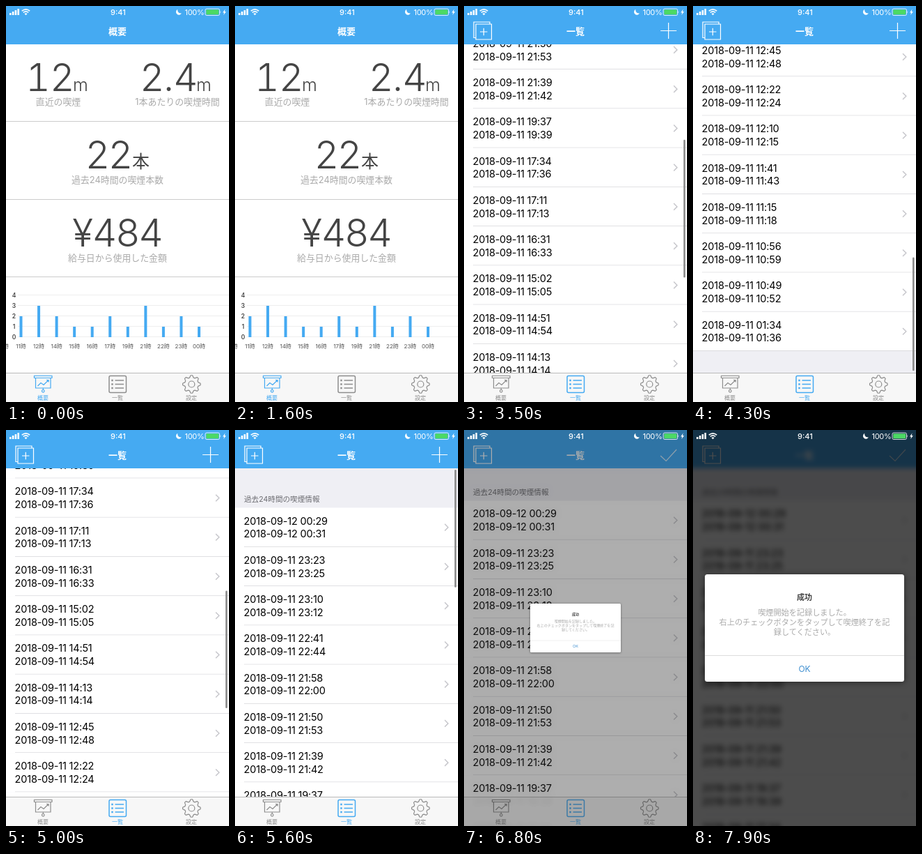
These frames come from a looping animation (320x568 px, 8000 ms). An HTML page:

```html
<!DOCTYPE html>
<html lang="ja">
<head>
<meta charset="utf-8">
<title>概要</title>
<style>
html, body { margin: 0; width: 100%; height: 100%; overflow: hidden; background: #fff; }
svg { display: block; width: 100vw; height: 100vh; font-family: Inter, "Noto Sans CJK JP", "Noto Sans CJK", sans-serif; }
.line { fill: none; stroke-width: 1.2; }
.mid { text-anchor: middle; }
.title { font-size: 13px; font-weight: 700; fill: #fff; }
.big { font-size: 55px; font-weight: 350; fill: #444; font-optical-sizing: none; letter-spacing: -.8px; }
.even { font-variant-numeric: tabular-nums; }
.unit { font-size: 25px; font-weight: 350; fill: #444; }
.cap { font-size: 12.9px; fill: #aaa; }
.row { font-size: 14.5px; letter-spacing: -.2px; fill: #000; }
.tab { font-size: 8px; font-weight: 500; }
.status { font-size: 11px; fill: #fff; }
.body { font-size: 11.15px; fill: #aaa; }
#shade { mix-blend-mode: multiply; }
#blur { filter: blur(3.5px); }
#card { filter: drop-shadow(0 1px 4px rgba(0,0,0,.5)); }
</style>
</head>
<body>
<svg viewBox="0 0 320 568">
  <rect width="320" height="568" fill="#fff"/>
  <g id="overview">
    <rect width="320" height="55" fill="#45aaf2"/>
    <text class="mid title" x="160" y="40.5">概要</text>
    <g class="big mid">
      <text class="even" x="63" y="122">12</text><text x="233.5" y="122">2.4</text>
      <text x="147.5" y="233">22</text><text x="160" y="345">¥484</text>
    </g>
    <g class="unit">
      <text x="96" y="122">m</text><text x="273" y="122">m</text><text x="181" y="232">本</text>
    </g>
    <g class="cap mid">
      <text x="75" y="142">直近の喫煙</text><text x="246" y="142">1本あたりの喫煙時間</text>
      <text x="160" y="254">過去24時間の喫煙本数</text><text x="160" y="365.5">給与日から使用した金額</text>
    </g>
    <path d="M0 165.5H320M0 277.5H320M0 388.5H320" stroke="#ccc"/>
    <g id="chart"></g>
  </g>
  <g id="list">
    <rect x="-30" y="0" width="380" height="620" fill="#efeff4"/>
    <g id="rows">
      <text x="13" y="93" font-size="10.6" fill="#6d6d72">過去24時間の喫煙情報</text>
    </g>
    <rect x="-30" y="-30" width="380" height="85" fill="#45aaf2"/>
    <text class="mid title" x="160" y="40.5">一覧</text>
  </g>
  <rect id="thumb" x="315" width="2.6" rx="1.3" fill="#8a8a8a"/>
  <g id="tabs">
    <rect y="526" width="320" height="42" fill="#f7f7f7"/>
    <path d="M0 526.5H320" stroke="#bbb"/>
    <g id="tab0">
      <path class="line" d="M40.5 530.5H66V533.5H40.5ZM42.5 533.5V548H64V533.5M45.5 545L50 540.5L54 543.5L61 536.5M58 536.5H61V539.5M53.3 548V550.5"/>
      <circle class="line" cx="53.3" cy="552.3" r="1.8"/>
      <text class="mid tab" x="53" y="565" stroke="none">概要</text>
    </g>
    <g id="tab1">
      <rect class="line" x="148" y="530.5" width="24.5" height="24" rx="2" style="stroke-width:1.5"/>
      <path class="line" style="stroke-width:1.6" d="M156.5 537H169M156.5 542.5H169M156.5 548H169"/>
      <path class="line" style="stroke-width:2.4" d="M151.3 537H153.7M151.3 542.5H153.7M151.3 548H153.7"/>
      <text class="mid tab" x="160" y="565" stroke="none">一覧</text>
    </g>
    <g id="tab2">
      <path class="line" id="gear"/>
      <circle class="line" cx="266.3" cy="542.5" r="4.5"/>
      <text class="mid tab" x="266" y="565" stroke="none">設定</text>
    </g>
  </g>
  <use id="blur" href="#list"/>
  <g id="icons" class="line" stroke="#fff">
    <path d="M17 26H39.5V48H17ZM16.5 45.5H14V23H37V25.5M23 37H33.5M28.3 31.8V42.2"/>
    <path id="plus" d="M282 35.5H305M293.5 24V47"/>
    <path id="check" d="M282 37L290 44.5L305 28" stroke-opacity=".75"/>
  </g>
  <rect id="shade" width="320" height="568"/>
  <g fill="#fff">
    <path d="M5 10h2.6v3h-2.6zM8.8 8h2.6v5h-2.6zM12.6 6h2.6v7h-2.6zM16.4 4h2.6v9h-2.6z"/>
    <path d="M22.8 7.2Q28.5 2.4 34.2 7.2M24.8 9.4Q28.5 6.2 32.2 9.4" fill="none" stroke="#fff" stroke-width="1.6"/>
    <path d="M26.4 11Q28.5 9.4 30.6 11L28.5 13.2Z"/>
    <text class="status mid" x="161" y="12.5" font-weight="500">9:41</text>
    <path d="M246.3 4.8A4.2 4.2 0 1 0 252 10.3A4.6 4.6 0 0 1 246.3 4.8Z"/>
    <text class="status" x="256.5" y="12.5" letter-spacing="-.3">100%</text>
    <rect x="286" y="4" width="20.5" height="9.5" rx="2" fill="none" stroke="#fff" stroke-width=".8"/>
    <rect x="287.3" y="5.3" width="18" height="7" rx="1" fill="#4cd964"/>
    <path d="M307.5 7.2q1.6 1.5 0 3zM314.5 4.5L311 9.5H313L312.3 13L315.8 8H313.8Z"/>
  </g>
  <g id="alert">
    <rect id="card" x="17" y="207" width="286" height="154" rx="3.5" fill="#fff"/>
    <text class="mid" x="160" y="244" font-size="11" font-weight="700" fill="#444">成功</text>
    <g class="body mid">
      <text x="160" y="265.5">喫煙開始を記録しました。</text>
      <text x="160" y="279.5">右上のチェックボタンをタップして喫煙終了を記</text>
      <text x="160" y="293.5">録してください。</text>
    </g>
    <path d="M17 323.5H303" stroke="#ddd"/>
    <text class="mid" x="160" y="346.5" font-size="12" fill="#3f8fd0">OK</text>
  </g>
</svg>
<script>
const $ = id => document.getElementById(id);
const set = (id, attrs) => { for (const k in attrs) $(id).setAttribute(k, attrs[k]); };
const show = (id, on) => set(id, { display: on ? 'inline' : 'none' });
const clamp = x => Math.min(1, Math.max(0, x));
const span = (t, a, b) => clamp((t - a) / (b - a));
const smooth = u => u * u * (3 - 2 * u);

// Chart: cigarettes per hour
const hours = [10, 11, 12, 14, 15, 16, 17, 19, 21, 22, 23, 0];
const counts = [2, 2, 3, 2, 1, 1, 2, 1, 3, 1, 2, 1];
let chart = '';
for (let n = 0; n <= 4; n++) {
  const y = 475 - 15 * n;
  chart += `<path d="M17 ${y - .5}H320" stroke="#eee"/>
    <text class="mid" x="11.5" y="${y + 3}" font-size="8.5" font-weight="600" fill="#444">${n}</text>`;
}
hours.forEach((h, i) => {
  const x = 21.5 + 25.55 * (i - 1), tall = 15 * counts[i];
  chart += `<rect x="${x - 2}" y="${475 - tall}" width="4" height="${tall}" fill="#45aaf2"/>
    <text class="mid" x="${x}" y="491" font-size="8" fill="#555">${String(h).padStart(2, 0)}時</text>`;
});
$('chart').innerHTML = chart;

// List: start and end of each smoke
const PITCH = 56.25, TOP = 101.4;
const smokes = ('00:29-00:31 23:23-23:25 23:10-23:12 22:41-22:44 21:58-22:00 21:50-21:53 21:39-21:42 ' +
  '19:37-19:39 17:34-17:36 17:11-17:13 16:31-16:33 15:02-15:05 14:51-14:54 14:13-14:14 12:45-12:48 ' +
  '12:22-12:24 12:10-12:15 11:41-11:43 11:15-11:18 10:56-10:59 10:49-10:52 01:34-01:36').split(' ');
$('rows').innerHTML += smokes.map((s, i) => {
  const y = TOP + PITCH * i, day = i ? 11 : 12, [from, to] = s.split('-');
  return `<rect x="-30" y="${y}" width="380" height="${PITCH + .3}" fill="#fff"/>
    <text class="row" x="12.6" y="${y + 24}">2018-09-${day} ${from}</text>
    <text class="row" x="12.6" y="${y + 42.8}">2018-09-${day} ${to}</text>
    <path d="M301 ${y + 23.3}l4.8 4.8l-4.8 4.8" class="line" stroke="#c7c7cc" style="stroke-width:1.5"/>
    <path d="M${i < 21 ? 13 : 0} ${y + PITCH - .3}H350" stroke="#d8d8dc"/>`;
}).join('');

// Gear with eight teeth
let gear = '';
for (let i = 0; i < 32; i++) {
  const a = (i - .5) * Math.PI / 16, r = i % 4 < 2 ? 12.8 : 9.8;
  gear += `${i ? 'L' : 'M'}${266.3 + r * Math.cos(a)} ${542.5 + r * Math.sin(a)}`;
}
set('gear', { d: gear + 'Z', 'stroke-linejoin': 'round' });

const END = 844, VIEW = 471, CONTENT = END + VIEW;
function scrollAt(t) {
  if (t < 4600) return END * smooth(span(t, 2900, 4260));
  if (t < 5500) return END - (END + 24) * smooth(span(t, 4600, 5500));
  return -24 * (1 - span(t, 5500, 5900)) ** 3;
}

function draw(t) {
  const listOn = t >= 2300, started = t >= 6600;
  show('overview', !listOn);
  show('list', listOn);
  show('icons', listOn);
  show('plus', !started);
  show('check', started);
  ['tab0', 'tab1', 'tab2'].forEach((id, i) => {
    const color = i === +listOn ? '#45aaf2' : '#8e8e8e';
    set(id, { stroke: color, fill: color });
  });

  const s = scrollAt(t);
  set('rows', { transform: `translate(0 ${-s})` });
  // Rows not yet seen count as shorter, so the thumb shrinks on the way down
  const left = t < 4300 ? END - s : 0;
  set('thumb', {
    y: 57 + 473 * Math.max(0, s) / (CONTENT - .19 * left),
    height: VIEW * VIEW / (CONTENT - .39 * left) - (s > END - 5 ? 6 : 0),
    opacity: t < 2900 ? 0 : 1 - span(t, 6000, 6300)
  });

  const p = span(t, 6650, 6980);
  const tone = Math.round(255 - 179 * p);
  show('shade', p > 0);
  set('shade', { fill: `rgb(${tone},${tone},${tone})` });
  show('blur', p > 0);
  set('blur', { opacity: p ** 3 });
  show('alert', p > 0);
  set('alert', { transform: `translate(160 284) scale(${p}) translate(-160 -284)` });
}

const begin = performance.now();
function tick() {
  const t = (performance.now() - begin) % 8000;
  draw(Math.floor(t / 100) * 100);
  requestAnimationFrame(tick);
}
tick();
</script>
</body>
</html>
```
